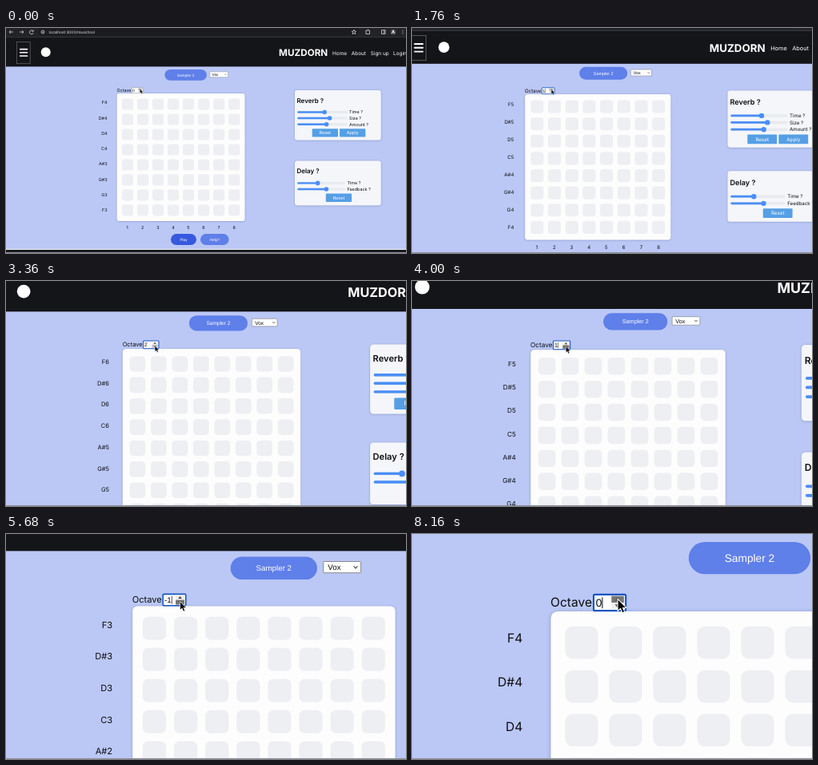
An HTML page that plays this animation: 500 px wide and 282 px high, repeating every 8240 ms.

```html
<!DOCTYPE html>
<html lang="en">
<head>
<meta charset="utf-8">
<title>Sampler zoom</title>
<style>
  html, body { margin: 0; width: 100%; height: 100%; overflow: hidden; background: #bbc8f5; }
  svg { display: block; width: 100vw; height: 100vh; }
  text { font-family: Inter, "Open Sans", sans-serif; text-rendering: geometricPrecision; white-space: pre; }
  .ui { font-family: "Liberation Sans", Arial, sans-serif; }
</style>
</head>
<body>
<svg id="stage" viewBox="0 0 500 282" preserveAspectRatio="none">
  <defs>
    <filter id="shadow" x="-10%" y="-10%" width="120%" height="120%">
      <feDropShadow dx="0" dy="0.3" stdDeviation="0.9" flood-color="#3c4a80" flood-opacity="0.45"/>
    </filter>
  </defs>
  <g id="page"></g>
  <rect y="281" width="500" height="1" fill="#8d919d"/>
</svg>
<script>
const LOOP = 8240, STEP = 80;
const FOCUS = { x: 120.25, y: 74.05 };
const INK = "#0c0d10", BUTTON = "#5f7fe9", SKY = "#559fe5", ACCENT = "#4a8ef6";
const page = document.getElementById("page");

function add(tag, attrs, parent = page) {
  const node = document.createElementNS("http://www.w3.org/2000/svg", tag);
  for (const key in attrs) node.setAttribute(key, attrs[key]);
  parent.appendChild(node);
  return node;
}
const box = (x, y, width, height, fill, rx = 0, extra = {}) =>
  add("rect", { x, y, width, height, fill, rx, ...extra });
const line = (d, stroke, width, extra = {}) =>
  add("path", { d, stroke, "stroke-width": width, fill: "none", ...extra });
function label(str, x, y, size, fill = INK, extra = {}) {
  const node = add("text", { x, y, "font-size": size, fill, ...extra });
  node.textContent = str;
  return node;
}
const MIDDLE = { "text-anchor": "middle" };
const UI = { class: "ui" };

function pill(str, x, y, w, h, fill) {
  box(x, y, w, h, fill, h / 2);
  label(str, x + w / 2, y + h / 2 + 1.65, 4.75, "#fff", { ...MIDDLE, ...UI });
}
function flatButton(str, x, y) {
  box(x, y, 32.3, 10.3, SKY, 0.8);
  label(str, x + 16.15, y + 7.1, 5.5, "#fff", MIDDLE);
}
function slider(str, y, end, thumb) {
  const x = 364.3;
  box(x, y - 1.1, end - x, 2.2, "#ebedf0", 1.1, { stroke: "#cdd1d8", "stroke-width": 0.3 });
  box(x, y - 1.2, thumb - x, 2.4, ACCENT, 1.2);
  add("circle", { cx: thumb, cy: y, r: 2.8, fill: ACCENT });
  label(str, end + 2.8, y + 1.95, 5.4);
}
function card(title, y, h) {
  box(361, y, 107.7, h, "#f4f6fa", 3, { filter: "url(#shadow)" });
  label(title, 363.5, y + 15.6, 8, INK, { "font-weight": 600 });
}

function drawBrowser() {
  box(0, 0, 500, 12, "#222326");
  box(40, -2, 401, 11.5, "#1b1c1f", 5);
  box(0, 11.3, 500, 0.7, "#37383b");
  const icon = (d) => line(d, "#d5d6d8", 0.8);
  icon("M9 5H4M6 3 4 5l2 2");
  icon("M17 5h5M20 3l2 2-2 2");
  icon("M33.6 3.6A2.4 2.4 0 1 0 34.2 6M34.2 2.4v1.8h-1.8");
  icon("M44 5a2 2 0 1 0 4 0a2 2 0 1 0-4 0M46 4.5v1.5");
  icon("M435 2.2l.8 1.9 2 .2-1.5 1.3.5 2-1.8-1.1-1.8 1.1.5-2-1.5-1.3 2-.2z");
  icon("M450 3h4.5v4.5H450zM452 2.2h1.2");
  icon("M469.5 2.7h4.6v4.6h-4.6zM472.7 2.7v4.6");
  add("circle", { cx: 484, cy: 5, r: 3.4, fill: "#4a4b50" });
  add("circle", { cx: 484, cy: 4, r: 1.2, fill: "#e4e4e6" });
  line("M482 7.2a2 1.8 0 0 1 4 0", "#e4e4e6", 1);
  for (const y of [3, 5, 7]) add("circle", { cx: 496, cy: y, r: 0.6, fill: "#d5d6d8" });
  label("localhost:3000/musictool", 53.5, 6.8, 4.8, "#e6e7e9");
}

function drawHeader() {
  box(0, 12, 500, 36.4, "#141519");
  box(13.4, 17.4, 16.8, 27.3, "none", 0, { stroke: "#65676c", "stroke-width": 0.7 });
  for (const y of [26.6, 30.8, 35]) box(17, y - 0.8, 10.2, 1.6, "#fff", 0.3);
  add("circle", { cx: 49.7, cy: 30.3, r: 6, fill: "#fff" });
  label("MUZDORN", 341, 35, 11.7, "#fff", { "font-weight": 700 });
  [["Home", 408], ["About", 431.8], ["Sign up", 455.7], ["Login", 484]]
    .forEach(([str, x]) => label(str, x, 33.6, 6.45, "#fff"));
}

function drawControls() {
  pill("Sampler 2", 198.3, 51.9, 52.7, 13.9, BUTTON);
  box(254.8, 54.8, 22.8, 6.9, "#fff", 0.4, { stroke: "#777", "stroke-width": 0.4 });
  label("Vox", 257.5, 60, 4.75, INK, UI);
  line("M273.2 57.6l1.2 1.3 1.2-1.3", "#333", 0.5);
  pill("Play", 206, 258.1, 32, 13.9, "#3759de");
  pill("Help?", 243, 258.1, 35.6, 13.9, BUTTON);
}

const noteLabels = [];
function drawGrid() {
  box(138.7, 82, 159.8, 160, "#fdfdfd", 3, { filter: "url(#shadow)" });
  for (let i = 0; i < 8; i++) {
    for (let j = 0; j < 8; j++)
      box(144.9 + 19.03 * i, 88.5 + 18.97 * j, 14.2, 14.1, "#eeeff3", 3.3);
    label(i + 1, 151.7 + 19.06 * i, 252, 5.4, INK, MIDDLE);
    noteLabels.push(label("", 126.5, 95.4 + 19.25 * i, 5.4, INK, { "text-anchor": "end" }));
  }
}

function drawCards() {
  card("Reverb ?", 78, 62.5);
  slider("Time ?", 105.5, 426.2, 398.2);
  slider("Size ?", 113, 426.2, 404.6);
  slider("Amount ?", 120.7, 426.2, 400.6);
  flatButton("Reset", 382.7, 126.2);
  flatButton("Apply", 417, 126.2);
  card("Delay ?", 166.4, 55.8);
  slider("Time ?", 194.4, 423.7, 389.7);
  slider("Feedback ?", 202, 423.7, 400.4);
  flatButton("Reset", 399.8, 207.6);
}

box(-5, -5, 510, 290, "#bbc8f5");
drawBrowser();
drawHeader();
drawControls();
drawGrid();
drawCards();
box(0, 277, 500, 1, "#f4f5f7");
box(0, 278, 500, 8, "#191a1d");

label("Octave", 138.5, 79.8, 5.4);
const field = box(157.2, 74.7, 13.9, 7, "#fff", 0.6);
const value = label("", 158.1, 79.9, 4.75, INK, UI);
const caret = box(0, 75.9, 0.35, 4.8, INK);
const upKey = box(164.9, 75.3, 5.4, 2.9, "#eee");
const downKey = box(164.9, 78.2, 5.4, 2.9, "#eee");
add("path", { d: "M166.4 77.4l1.2-1.4 1.2 1.4zM166.4 79l1.2 1.4 1.2-1.4z", fill: "#4c4c4c" });
const pointer = add("path", {
  d: "M0 0V5.2L1.2 4.1 2 6 3 5.6 2.2 3.8H3.8Z",
  fill: "#000", stroke: "#fff", "stroke-width": 0.35, "stroke-linejoin": "round"
});

// Visible share of the page width over time; the zoom keeps FOCUS in place.
const VIEW = [[0, 1], [960, 0.947], [2480, 0.806], [3360, 0.719], [4720, 0.586],
              [6160, 0.441], [6720, 0.398], [7040, 0.382], [8160, 0.346]];
const slope = (i) => (VIEW[i + 1][1] - VIEW[i][1]) / (VIEW[i + 1][0] - VIEW[i][0]);
function tangent(i) {
  if (i === 0) return slope(0) * 0.4;
  if (i === VIEW.length - 1) return 0;
  const a = slope(i - 1), b = slope(i);
  return 2 * a * b / (a + b);
}
function viewAt(t) {
  let i = 0;
  while (i < VIEW.length - 2 && t >= VIEW[i + 1][0]) i++;
  const [t0, v0] = VIEW[i], [t1, v1] = VIEW[i + 1];
  const h = t1 - t0, u = Math.min(1, (t - t0) / h), w = 1 - u;
  return v0 * (1 + 2 * u) * w * w + v1 * u * u * (3 - 2 * u)
    + h * u * w * (w * tangent(i) - u * tangent(i + 1));
}

const CLICKS = [[560, 1], [2320, 2], [3760, 1], [4240, 0], [5360, -1], [6000, -2], [7200, -1], [7760, 0]];
const NOTES = [["F", 4], ["D#", 4], ["D", 4], ["C", 4], ["A#", 3], ["G#", 3], ["G", 3], ["F", 3]];
function ramp(t, from, to) {
  const u = Math.max(0, Math.min(1, (t - from) / (to - from)));
  return u * u * (3 - 2 * u);
}

function render(t) {
  const scale = 1 / viewAt(t);
  page.setAttribute("transform",
    `translate(${FOCUS.x} ${FOCUS.y}) scale(${scale}) translate(${-FOCUS.x} ${-FOCUS.y})`);

  const click = CLICKS.filter(([at]) => at <= t).pop();
  const octave = click ? click[1] : 0;
  const since = click ? t - click[0] : Infinity;
  NOTES.forEach(([name, base], i) => { noteLabels[i].textContent = name + (base + octave); });

  value.textContent = octave;
  field.setAttribute("stroke", click ? "#1556c0" : "#777");
  field.setAttribute("stroke-width", click ? 0.75 : 0.4);
  caret.setAttribute("x", octave < 0 ? 162.4 : 160.8);
  caret.setAttribute("visibility", click && since % 1060 < 530 ? "visible" : "hidden");

  const low = ramp(t, 2720, 3120) - ramp(t, 6800, 7120);
  const active = since < 420 ? "#777" : "#c6c6c8";
  upKey.setAttribute("fill", low < 0.5 ? active : "#efefef");
  downKey.setAttribute("fill", low < 0.5 ? "#efefef" : active);
  pointer.setAttribute("transform", `translate(167.6 ${76.6 + 2.6 * low})`);
}

const start = performance.now();
function tick() {
  const t = (performance.now() - start) % LOOP;
  render(Math.floor(t / STEP) * STEP);
  requestAnimationFrame(tick);
}
tick();
</script>
</body>
</html>
```
